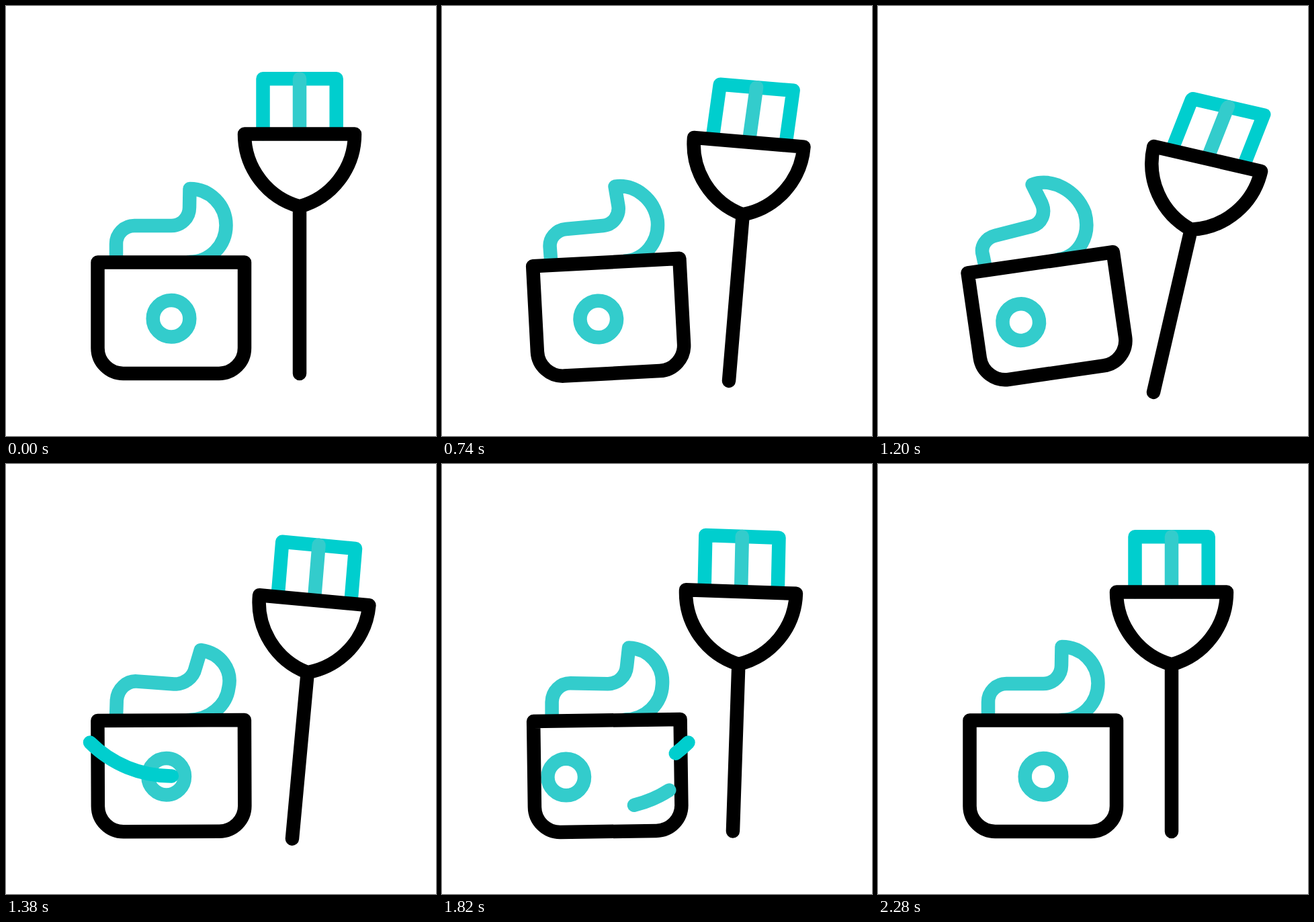
Recreate the animation shown at these times as an HTML page. Size 640 px wide and 640 px high, loop 2.4 s.

```html
<!DOCTYPE html>
<html>
<head>
<meta charset="utf-8">
<style>
html, body { margin: 0; width: 100%; height: 100%; overflow: hidden; background: #fff; }
svg { display: block; width: 100%; height: 100%; }
</style>
</head>
<body>
<svg viewBox="0 0 640 640" fill="none" stroke="#000" stroke-width="20.5" stroke-linecap="round" stroke-linejoin="round">
  <defs>
    <path id="pot" d="M136.5 381.5H355V509A38 38 0 0 1 317 547H174.5A38 38 0 0 1 136.5 509Z"/>
    <clipPath id="inside"><use href="#pot"/></clipPath>
  </defs>
  <g id="jar">
    <path id="cream" stroke="#3cc"/>
    <use href="#pot" fill="#fff" stroke="none"/>
    <g clip-path="url(#inside)">
      <g id="rings" stroke="#3cc">
        <circle cx="246" cy="465.2" r="27.3"/>
        <circle cx="6" cy="465.2" r="27.3"/>
      </g>
    </g>
    <use href="#pot"/>
  </g>
  <path id="low" pathLength="1" stroke="#3cc" d="M153 485A171 171 0 0 0 339 485"/>
  <path id="high" pathLength="1" stroke="#00cece" d="M125 414.5A171 171 0 0 0 366.5 414.5"/>
  <g id="brush">
    <g id="hair">
      <path stroke="#00cece" d="M382.5 190V108.3H491.7V190"/>
      <path stroke="#3cc" d="M437 190V108.3"/>
    </g>
    <path d="M355 190.5H519A112 112 0 0 1 437 298.5A112 112 0 0 1 355 190.5ZM437 298.5V547"/>
  </g>
</svg>
<script>
const LOOP = 2400, START = 420, END = 2280;
const CREAM = 'M164,381L164,354C164,339 176,327 191,327L246,327C261,327 273,315 273,300' +
  'L273.5,272C303.5,272 327.5,296.5 327.5,326.5C327.5,356.5 303.5,381 273,381';

const $ = id => document.getElementById(id);
const move = (id, value) => $(id).setAttribute('transform', value);

function ease(t, from, to) {
  const u = Math.min(1, Math.max(0, (t - from) / (to - from)));
  return u * u * (3 - 2 * u);
}

// Eases from 0 at START through each [time, value] stop in turn
function swing(t, ...stops) {
  let from = START, value = 0;
  for (const [to, next] of stops) {
    value += (next - value) * ease(t, from, to);
    if (t < to) break;
    from = to;
  }
  return value;
}

// The brush swings right, left, right again, then settles
const brushSwing = (t, a, b, c) => swing(t, [1200, a], [1600, b], [2000, c], [END, 0]);
// The jar leans back, rights itself while spinning, then rocks once
const jarSwing = (t, a, b, c) => swing(t, [1200, a], [1400, b], [1600, b], [2000, c], [END, 0]);

// Curls the cream sideways, more the higher it stands above the rim
function curl(sway) {
  return CREAM.replace(/([\d.]+),([\d.]+)/g, (_, x, y) => {
    const h = 381 - y, bend = sway * h * .0015;
    return `${+x + bend * h},${+y + bend * (x - 240)}`;
  });
}

function trim(id, start, end) {
  const path = $(id);
  path.style.display = end - start > .01 ? '' : 'none';
  path.setAttribute('stroke-dasharray', `${end - start} 3`);
  path.setAttribute('stroke-dashoffset', -start);
}

function draw(now) {
  const t = now % LOOP;
  move('brush', `translate(0 ${brushSwing(t, 31, -15, 10)}) rotate(${brushSwing(t, 13, -5, 7)} 437.2 427)`);
  move('hair', `translate(0 190) skewX(${-brushSwing(t, 8.5, -12.6, 8)}) translate(0 -190)`);
  move('jar', `rotate(${jarSwing(t, -8.2, 0, -1.4)} 246 410)`);
  move('rings', `translate(${swing(t, [1180, -42], [2100, 240])} 0)`);
  $('cream').setAttribute('d', curl(jarSwing(t, -1.3, 1, -.1)));
  trim('high', ease(t, 1480, 1900), ease(t, 1200, 1560));
  trim('low', ease(t, 1360, 2080), ease(t, 1360, 1840));
  requestAnimationFrame(() => draw(performance.now() - begin));
}

const begin = performance.now();
draw(0);
</script>
</body>
</html>
```
